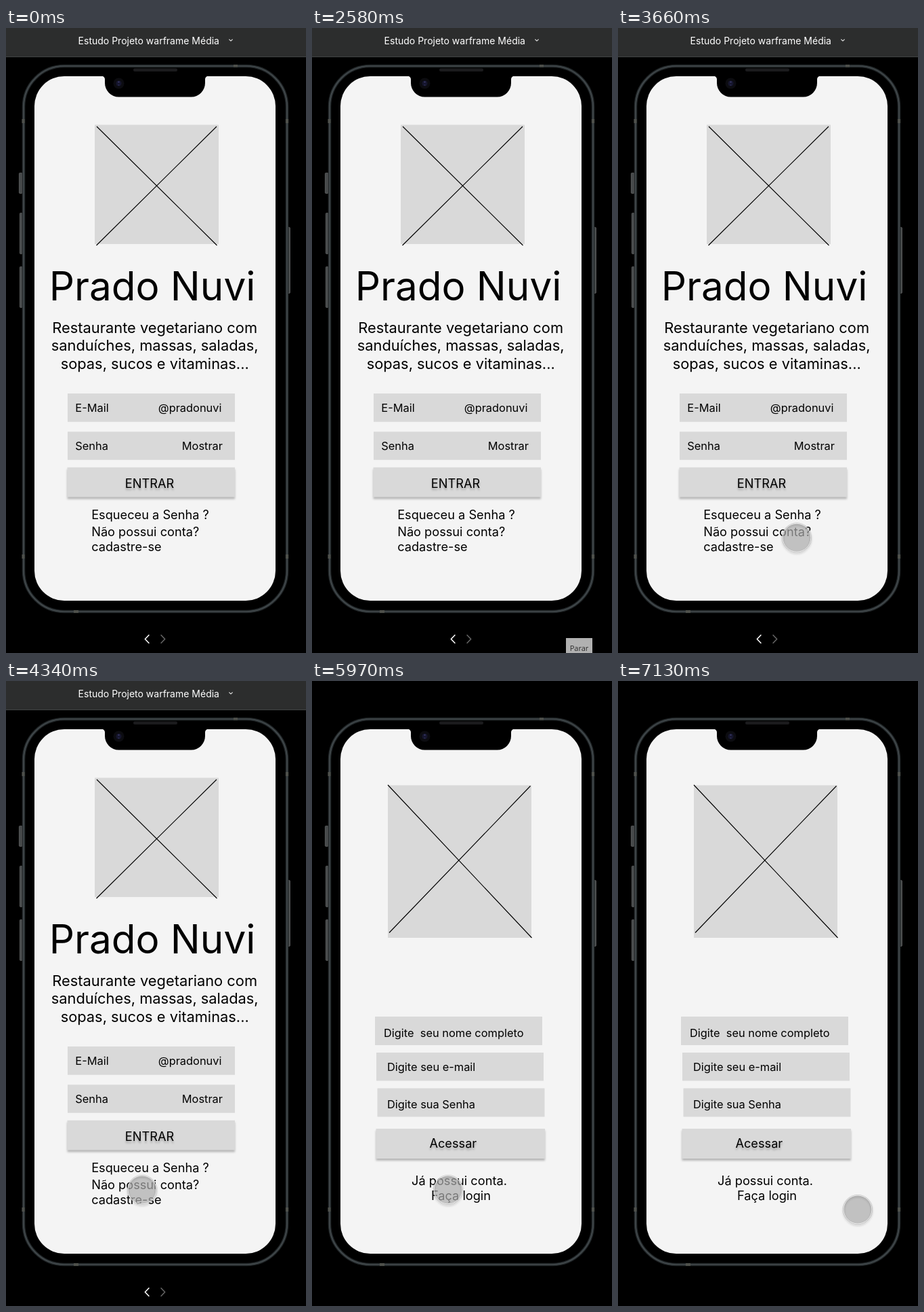
Write an HTML page that moves like this. It is 443 px wide and 920 px high and loops after 8 s.

```html
<!DOCTYPE html>
<html lang="pt-BR">
<head>
<meta charset="utf-8">
<title>Estudo Projeto</title>
<style>
  html, body { margin: 0; width: 100%; height: 100%; overflow: hidden; background: #000; }
  svg { display: block; width: 100vw; height: 100vh; }
  text { font-family: Inter, sans-serif; font-optical-sizing: none; white-space: pre; }
  .mid { text-anchor: middle; }
  .end { text-anchor: end; }
  .title { font-size: 58.4px; }
  .lead { font-size: 21.85px; }
  .field { font-size: 16.4px; }
  .link { font-size: 18.2px; }
  .box { fill: #d9d9d9; }
  .raised { filter: drop-shadow(0 3.6px 1.8px rgba(0, 0, 0, .25)); }
  .halo { filter: drop-shadow(0 2px 1.5px rgba(0, 0, 0, .35)); }
  .cross { stroke: #000; stroke-width: 1.15; fill: none; }
  .tip { font-family: "Open Sans", sans-serif; font-size: 11px; fill: #3c3c3c; }
</style>
</head>
<body>
<svg viewBox="0 0 443 920" xmlns="http://www.w3.org/2000/svg">
  <rect width="443" height="920" fill="#000"/>

  <g id="chrome">
    <rect width="443" height="42" fill="#2c2d2d"/>
    <rect y="42" width="443" height="1" fill="#414343"/>
    <text x="106.6" y="24" font-size="14" fill="#fff">Estudo Projeto warframe Média</text>
    <path d="M329.4 16.6l2.6 2.5 2.6-2.5" fill="none" stroke="#eee" stroke-width="1.1"/>
    <path d="M211.4 893.2l-6 6.3 6 6.3" fill="none" stroke="#fff" stroke-width="1.5"/>
    <path d="M228.6 893.2l6 6.3-6 6.3" fill="none" stroke="#666" stroke-width="1.5"/>
  </g>

  <g id="phone">
    <g fill="#474a4b" stroke="#6a6c6d" stroke-width=".7">
      <rect x="19.4" y="213.4" width="4.6" height="30" rx="1"/>
      <rect x="20.4" y="272.4" width="3.6" height="60" rx="1"/>
      <rect x="20.4" y="351.4" width="3.6" height="60" rx="1"/>
      <rect x="416" y="293.4" width="3.4" height="97" rx="1"/>
    </g>
    <rect x="26" y="56" width="389" height="803" rx="60" fill="#000" stroke="#23282a" stroke-width="4.6"/>
    <rect x="26" y="56" width="389" height="803" rx="60" fill="none" stroke="#434a4d" stroke-width="1.7"/>
    <g fill="#4e504b">
      <rect x="23.5" y="134" width="4" height="6"/>
      <rect x="413" y="134" width="4" height="6"/>
      <rect x="23.5" y="775" width="4" height="6"/>
      <rect x="413" y="775" width="4" height="6"/>
      <rect x="336" y="54" width="6" height="3.5"/>
      <rect x="100" y="857" width="7" height="4"/>
    </g>
    <rect x="42" y="71" width="356" height="772" rx="44" fill="#f4f4f4"/>
    <path d="M141 70.5A5 5 0 0 1 146 76V81A20.5 20.5 0 0 0 166.5 101.5H273.5A20.5 20.5 0 0 0 294 81V76A5 5 0 0 1 299 70.5Z" fill="#000"/>
    <rect x="188" y="59.5" width="65" height="4.5" rx="2" fill="#1b1b1d"/>
    <circle cx="166.5" cy="81.5" r="8" fill="#0c0c10"/>
    <circle cx="166.5" cy="81.5" r="4" fill="#15152c"/>
    <circle cx="166.5" cy="79.5" r="1.3" fill="#34345e"/>
    <circle cx="166.5" cy="84" r="1.1" fill="#2c2c50"/>
  </g>

  <g id="login">
    <rect class="box" x="131" y="142.5" width="183" height="175.5"/>
    <path class="cross" d="M134 145L311.5 320M311 145L133.5 320"/>
    <text class="title mid" x="216" y="401">Prado Nuvi</text>
    <text class="lead mid" x="219.7" y="448.7">Restaurante vegetariano com</text>
    <text class="lead mid" x="219.7" y="475.3">sanduíches, massas, saladas,</text>
    <text class="lead mid" x="219.7" y="501.8">sopas, sucos e vitaminas...</text>
    <rect class="box" x="91" y="538" width="247" height="41.7"/>
    <text class="field" x="102.3" y="564.5">E-Mail</text>
    <text class="field end" x="318.5" y="564.5">@pradonuvi</text>
    <rect class="box" x="91" y="594.3" width="247" height="41.4"/>
    <text class="field" x="102.3" y="621">Senha</text>
    <text class="field end" x="320" y="621">Mostrar</text>
    <rect class="box raised" x="90.5" y="646.7" width="247.5" height="43.7"/>
    <text class="link mid raised" x="212" y="676.7">ENTRAR</text>
    <text class="link" x="126.2" y="722.5">Esqueceu a Senha ?</text>
    <text class="link" x="126.2" y="748">Não possui conta?</text>
    <text class="link" x="126.2" y="770">cadastre-se</text>
  </g>

  <g id="signup">
    <rect class="box" x="112" y="153.5" width="212" height="224.5"/>
    <path class="cross" d="M112 153L324.5 378M322.5 154.5L114 370.5"/>
    <rect class="box" x="93" y="494" width="247" height="42"/>
    <text class="field" x="106" y="523.5">Digite  seu nome completo</text>
    <rect class="box" x="95" y="547" width="247" height="41.5"/>
    <text class="field" x="111" y="573.7">Digite seu e-mail</text>
    <rect class="box" x="96.5" y="599.5" width="247" height="42"/>
    <text class="field" x="111" y="628.5">Digite sua Senha</text>
    <rect class="box raised" x="94.5" y="659" width="249.5" height="44"/>
    <text class="link mid raised" x="208.3" y="686.5">Acessar</text>
    <text class="link mid" x="217.5" y="742">Já possui conta.</text>
    <text class="link mid" x="220" y="764">Faça login</text>
  </g>

  <g id="tip">
    <rect x="375" y="898" width="39" height="24" fill="#fff"/>
    <text class="tip mid" x="394.5" y="916.5">Parar</text>
  </g>

  <g id="touch">
    <circle id="disc" r="21.5" fill="#adadad" fill-opacity=".7"/>
    <g class="halo" fill="none">
      <circle r="21.6" stroke="#8f8f8f" stroke-opacity=".45" stroke-width=".8"/>
      <circle r="20.9" stroke="#fff" stroke-opacity=".85" stroke-width=".9"/>
    </g>
  </g>
</svg>
<script>
  const LOOP = 8000, SWAP = 5970;
  const el = id => document.getElementById(id);
  const [chrome, login, signup, tip, touch, disc] =
    ["chrome", "login", "signup", "tip", "touch", "disc"].map(el);

  const ramp = (t, a, b) => Math.min(1, Math.max(0, (t - a) / (b - a)));
  const show = (node, on) => node.style.display = on ? "" : "none";

  // Pointer track: time, x, y
  const track = [
    [2850, 359, 842], [2920, 349, 822], [3000, 333, 792], [3070, 321, 768],
    [3200, 311, 750], [3470, 311, 750], [3600, 284, 752], [3740, 238, 748],
    [3870, 214, 745], [3950, 214, 745], [4070, 206, 744], [4150, 206, 744],
    [4340, 201, 749], [6440, 201, 749], [6570, 222, 756], [6700, 274, 778],
    [6850, 330, 796], [6990, 349, 788], [7130, 354, 778]
  ];

  function pointer(t) {
    const i = track.findIndex(p => p[0] > t);
    if (i < 0) return track[track.length - 1].slice(1);
    const a = track[Math.max(0, i - 1)], b = track[i], k = ramp(t, a[0], b[0]);
    return [1, 2].map(n => a[n] + (b[n] - a[n]) * k);
  }

  function draw(t) {
    chrome.style.opacity = 1 - ramp(t, 4810, 5150);
    tip.style.opacity = ramp(t, 1000, 1190) - ramp(t, 2520, 2720);
    show(login, t < SWAP);
    show(signup, t >= SWAP);
    show(touch, t >= track[0][0]);

    const press = t < SWAP ? ramp(t, 5650, 5770) : 0;
    const [x, y] = pointer(t);
    touch.setAttribute("transform", `translate(${x} ${y}) scale(${1 - .07 * press})`);
    disc.setAttribute("fill-opacity", .7 + .08 * press);
  }

  const start = performance.now();
  function tick() {
    draw((performance.now() - start) % LOOP);
    requestAnimationFrame(tick);
  }
  tick();
</script>
</body>
</html>
```
